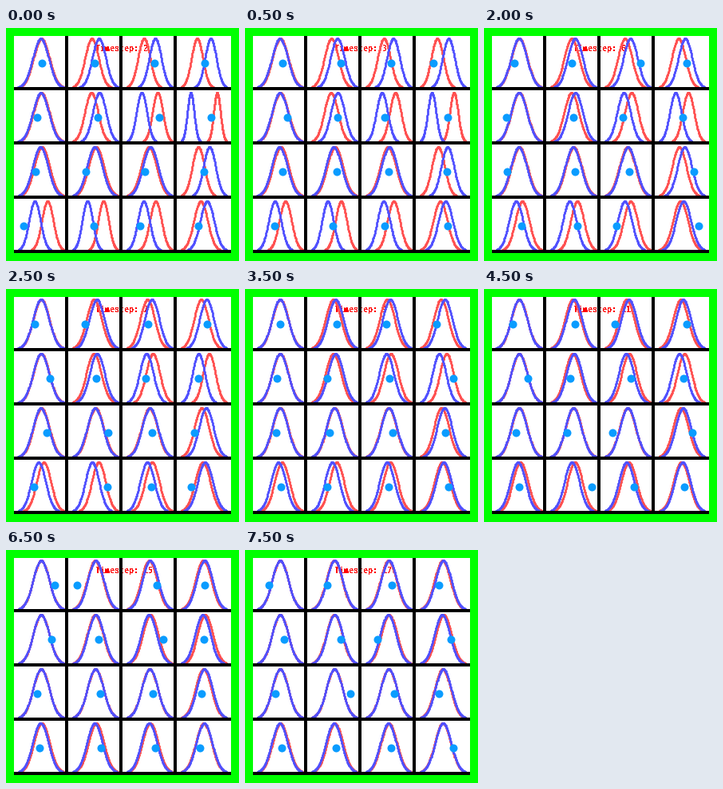
Animation of 292 by 292 pixels, one loop 8 s. Source, as a matplotlib script:

```python
import numpy as np
import matplotlib.pyplot as plt
from matplotlib.animation import FuncAnimation
from matplotlib.patches import Rectangle

SIZE, DPI, FRAMES = 292, 100, 16
EDGE, CELL, GAP = 10, 68, 4
PX = 72 / DPI
RED, BLUE, DOT = "#ff5050", "#5050ff", "#0a9cff"

# signed half distance of the two peaks at the start, panel by panel
START = np.array([0.5, -4.5, -7, -8.5, 0.5, -5, 10, 16.5,
                  1, 1, -1, -7, 8, 10, 7.5, -4])
DECAY = 0.835
REACH = 2.85
HALF_WIDTH = 28.5
SPREAD = 9.5

cells = np.arange(16)
cx = EDGE + CELL / 2 + CELL * (cells % 4)
top = EDGE + CELL * (cells // 4)

u = np.linspace(-REACH, REACH, 110)
bell = 65 - 62 * np.exp(-u ** 2 / 2)

fig = plt.figure(figsize=(SIZE / DPI, SIZE / DPI), dpi=DPI, facecolor="#00ff00")
ax = fig.add_axes([0, 0, 1, 1])
ax.set(xlim=(0, SIZE), ylim=(SIZE, 0))
ax.axis("off")


def box(x, y, w, h, color, z):
    ax.add_patch(Rectangle((x, y), w, h, fc=color, lw=0, zorder=z))


def markers(color, size, z):
    return ax.plot([], [], "o", color=color, ms=size * PX, mew=0,
                   zorder=z, antialiased=False)[0]


side = 4 * CELL
box(EDGE, EDGE, side, side, "white", 0)
for k in range(1, 5):
    line = EDGE + k * CELL - GAP
    box(EDGE, line, side, GAP, "black", 4)
    if k < 4:
        box(line, EDGE, GAP, side, "black", 4)

label = ax.text(112.5, 29, "", color="red", family="DejaVu Sans Mono",
                weight="bold", size=10 * PX, va="baseline", zorder=1,
                antialiased=False)
red = markers(RED, 3, 2)
blue = markers(BLUE, 3, 3)
dots = markers(DOT, 10, 5)


def curves(shift, sigma):
    x = (cx + shift)[:, None] + sigma[:, None] * u
    y = top[:, None] + bell
    return np.rint(x).ravel() - 0.5, np.rint(y).ravel() - 0.5


def draw(i):
    shift = START * DECAY ** i
    sigma = (HALF_WIDTH - abs(shift)) / REACH
    red.set_data(*curves(shift, sigma))
    blue.set_data(*curves(-shift, sigma))
    sample = np.random.default_rng(i).normal(0, SPREAD, 16)
    sample = np.rint(np.clip(sample, -23, 23))
    dots.set_data(cx + sample, top + CELL / 2)
    label.set_text(f"Timestep: {i + 2}")
    return red, blue, dots, label


anim = FuncAnimation(fig, draw, frames=FRAMES, interval=500,
                     repeat=True, repeat_delay=0)
plt.show()
```
